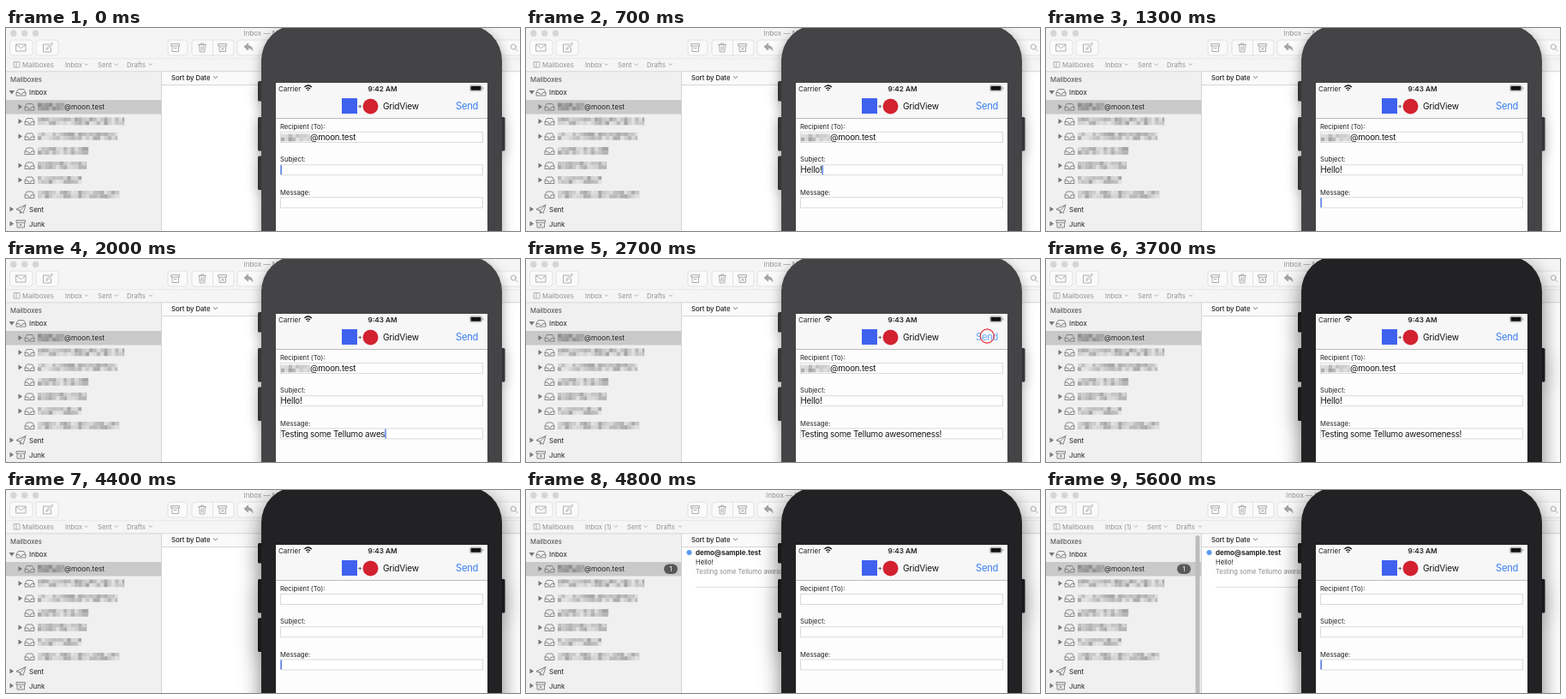
These frames come from a looping animation (600 px wide and 237 px high, 5700 ms). An HTML page:

```html
<!DOCTYPE html>
<html lang="en">
<head>
<meta charset="utf-8">
<title>Mail form</title>
<style>
  html, body { margin: 0; width: 100%; height: 100%; overflow: hidden; background: #fff; }
  svg { display: block; width: 600px; height: 237px; }
  text { font-family: Inter, "Liberation Sans", sans-serif; font-size: 8px; fill: #222; white-space: pre; }
  .small { font-size: 7.7px; }
  .dim { fill: #929292; }
  .input { font-size: 9.8px; letter-spacing: -.025em; fill: #161616; }
  .line { fill: none; stroke: #a6a6a6; stroke-width: .9; stroke-linejoin: round; stroke-linecap: round; }
  .tray { fill: none; stroke: #7c7c7c; stroke-width: .9; stroke-linejoin: round; }
  .button { fill: #fbfafb; stroke: #dcdcdc; stroke-width: .8; }
  #phone { filter: drop-shadow(0 4px 7px rgba(0, 0, 0, .36)); }
  #phone.active { filter: drop-shadow(0 8px 12px rgba(0, 0, 0, .52)); }
  .shell { fill: #444446; }
  .side { fill: #353537; }
  .active .shell { fill: #222224; }
  .active .side { fill: #19191b; }
</style>
</head>
<body>
<svg viewBox="0 0 600 237">
  <rect width="600" height="237" fill="#fff"/>
  <rect width="600" height="51" fill="#f6f5f6"/>
  <rect x="182" y="51" width="120" height="15.500" fill="#fafafa"/>
  <rect y="51" width="181" height="186" fill="#f1f0f1"/>
  <rect y="84" width="181" height="16.500" fill="#c9c9c9"/>
  <path d="M0 50.800H600M181.500 51V237M182 66.500H300" stroke="#d6d6d6" fill="none"/>
  <path d="M0 35.800H600" stroke="#e6e6e6" fill="none"/>
  <g fill="#d6d6d6">
    <circle cx="8.800" cy="6.300" r="3.700"/>
    <circle cx="21.700" cy="6.300" r="3.700"/>
    <circle cx="34.600" cy="6.300" r="3.700"/>
  </g>
  <text class="dim" id="title" y="9">Inbox — Messages</text>

  <g class="button">
    <rect x="4.500" y="14" width="26.500" height="18" rx="3"/>
    <rect x="35" y="14" width="26" height="18" rx="3"/>
    <rect x="189" y="14" width="22.500" height="18" rx="3"/>
    <rect x="217" y="14" width="49" height="18" rx="3"/>
    <path d="M241.500 14V32"/>
    <rect x="270" y="14" width="60" height="18" rx="3"/>
    <rect x="560" y="14" width="50" height="18" rx="3"/>
  </g>
  <g class="line">
    <path d="M12 19h11v8H12zM12 19.500l5.500 4.200L23 19.500"/>
    <path d="M50 19h-6.500v9h9v-5M47 25l1-2.500 5.500-5.500 1.300 1.300L49.200 24z"/>
    <path d="M193 18.500h9.500v2.500H193zM194 21v6.500h7.500V21M196.500 23.500h2.500"/>
    <path d="M224.500 19.500h9M227.500 19.500v-1.500h3v1.500M225.500 19.500l.7 8.500h5.600l.7-8.500M228 21.500v4.500M230 21.500v4.500"/>
    <path d="M248 18.500h9.500V21H248zM249 21v6.500h7.500V21M251 22.500l3.500 3.500M254.500 22.500L251 26"/>
    <path d="M282.500 18l-4.500 4 4.500 4v-2.500q4-.3 5.500 3-.3-6-5.500-6z" fill="#a6a6a6"/>
    <circle cx="592.300" cy="22" r="3"/><path d="M594.600 24.300l2.600 2.600"/>
    <path d="M9.500 39.500h6.500v6.500H9.500zM12 39.500v6.500" stroke-width=".8"/>
  </g>

  <text class="small dim" x="19" y="45.500">Mailboxes</text>
  <text class="small dim" x="69" y="45.500" id="inboxTab">Inbox</text>
  <g id="tabs">
    <path class="line" d="M92 41.700l1.800 1.800 1.800-1.800"/>
    <text class="small dim" x="107" y="45.500">Sent</text>
    <path class="line" d="M127 41.700l1.800 1.800 1.800-1.800"/>
    <text class="small dim" x="141" y="45.500">Drafts</text>
    <path class="line" d="M167 41.700l1.800 1.800 1.800-1.800"/>
  </g>
  <text class="small" x="193" y="60.600" font-weight="500">Sort by Date</text>
  <path class="line" d="M242.500 56.700l2 2 2-2" style="stroke:#555"/>

  <text class="small" x="5" y="62.700" style="fill:#444">Mailboxes</text>
  <g id="sidebar"></g>
  <rect id="scrollbar" x="174.500" y="53" width="5" height="190" rx="2.500" fill="#bcbcbc"/>

  <g id="badge">
    <rect x="161" y="86.500" width="16" height="11.500" rx="5.700" fill="#585858"/>
    <text x="169" y="95" text-anchor="middle" style="fill:#fff;font-size:7.500px">1</text>
  </g>

  <g id="mail">
    <circle cx="190.500" cy="73" r="3" fill="#5b9af0"/>
    <text x="198" y="76" font-weight="700">demo@sample.test</text>
    <text class="small" x="198" y="87">Hello!</text>
    <text x="198" y="98" style="fill:#8a8a8a;font-size:7.500px">Testing some Tellumo awesomeness!</text>
    <path d="M198 113.500H300" stroke="#ddd"/>
  </g>

  <g id="phone">
    <g class="side">
      <rect x="294" y="62" width="8" height="23.500" rx="1.500"/>
      <rect x="294" y="104" width="8" height="39.500" rx="1.500"/>
      <rect x="294" y="149.500" width="8" height="39.500" rx="1.500"/>
      <rect x="575" y="104" width="7.500" height="39.500" rx="1.500"/>
    </g>
    <rect class="shell" x="298" y="-4" width="281" height="300" rx="42"/>
  </g>

  <rect x="315" y="64" width="247" height="173" fill="#fdfdfe"/>
  <rect x="315" y="64" width="247" height="41.500" fill="#f7f7f8"/>
  <path d="M315 105.500H562" stroke="#bcbcbe"/>
  <text x="318" y="73.500" style="font-size:8px">Carrier</text>
  <g fill="none" stroke="#111" stroke-width="1.300">
    <path d="M348.500 69q4.200-3.900 8.400 0M350.300 71q2.400-2.200 4.800 0"/>
    <path d="M351.800 72.200h1.800l-.9 1z" fill="#111" stroke-width=".6"/>
  </g>
  <text id="clock" x="439.500" y="73.500" text-anchor="middle" font-weight="600" style="font-size:8.200px"></text>
  <rect x="541.500" y="66.800" width="14" height="7" rx="1.600" fill="none" stroke="#a5a5a7" stroke-width=".7"/>
  <rect x="542.500" y="67.800" width="12" height="5" rx=".8" fill="#111"/>
  <rect x="556.300" y="69" width="1" height="2.500" rx=".5" fill="#a5a5a7"/>

  <rect x="392" y="82" width="18" height="18" fill="#3f62ee"/>
  <text x="410.500" y="94">+</text>
  <circle cx="425.500" cy="91.500" r="9" fill="#d3222f"/>
  <text class="input" x="440" y="95" style="font-size:10.200px">GridView</text>
  <text class="input" id="send" x="525" y="95.200" style="font-size:11.200px">Send</text>

  <g id="form"></g>
  <g id="recipient">
    <g id="recipientName"></g>
    <text class="input" x="355" y="131">@moon.test</text>
  </g>
  <text class="input" id="subject" x="320.500" y="169.300"></text>
  <text class="input" id="message" x="320.500" y="207.600"></text>
  <rect id="caret" width="1.400" height="11" fill="#4a78e8"/>
  <circle id="ring" cx="538.300" cy="90" fill="none" stroke="#e2232f" stroke-width="1.100"/>
</svg>
<script>
const LOOP = 5700, STEP = 100;
const SUBJECT = 'Hello!', MESSAGE = 'Testing some Tellumo awesomeness!';
const CLOCK_TURN = 900, FOCUS_MESSAGE = 1200, PRESS = 2600, ACTIVATE = 2800;
const CLEAR = 3900, ARRIVE = 4500, SCROLLBAR = 5100;
const $ = id => document.getElementById(id);
const show = (id, on) => $(id).setAttribute('visibility', on ? 'visible' : 'hidden');
const shift = (id, dx) => $(id).setAttribute('transform', `translate(${dx})`);
const setText = (id, s) => { if ($(id).textContent !== s) $(id).textContent = s; };

let seed = 11;
const random = () => (seed = seed * 16807 % 2147483647) / 2147483647;

// Coarse grey blocks standing in for a hidden name
function mosaic(x, y, width, dark, light) {
  const cell = 4.3;
  let out = '';
  for (let row = 0; row < 2; row++) {
    for (let dx = 0; dx < width; dx += cell) {
      const g = Math.round(dark + (light - dark) * random());
      const w = Math.min(cell, width - dx) + .2;
      out += `<rect x="${x + dx}" y="${y - 4.5 + row * cell}" width="${w}" height="${cell + .2}" fill="rgb(${g},${g},${g})"/>`;
    }
  }
  return out;
}

const tray = (x, y) => `<path class="tray" d="M${x} ${y + .5}l2.300-4h6.400l2.300 4v3.500h-11zh3.300q.3 2 2.200 2t2.200-2h3.300"/>`;
const closed = (x, y) => `<path d="M${x} ${y - 3}l4.500 3-4.500 3z" fill="#757575"/>`;
const label = (y, s) => `<text x="27" y="${y + 3}">${s}</text>`;

function buildSidebar() {
  // [row centre, hidden width, expandable]
  const accounts = [[92, 31, 1], [109, 101, 1], [126.5, 93, 1], [143.5, 59, 0],
                    [160.5, 57, 1], [177.5, 51, 1], [194.5, 95, 0]];
  let out = '<path d="M3.500 73h6.500l-3.250 4.500z" fill="#757575"/>' + tray(12, 75) + label(75, 'Inbox');
  accounts.forEach(([y, w, open], i) => {
    out += (open ? closed(14.5, y) : '') + tray(22, y);
    out += i ? mosaic(37, y, w, 165, 226) : mosaic(37, y, w, 138, 194);
  });
  out += '<text x="68" y="95" style="font-size:8.300px">@moon.test</text>';
  out += closed(4.5, 211.5) + '<path class="tray" d="M12 211.500l11-5-3 10-3.500-3zl4.500 1.500 6.500-6.500M16.500 213v3.500l1.700-2"/>' + label(211.5, 'Sent');
  out += closed(4.5, 228.5) + '<path class="tray" d="M12 224.500h10.500v2.500H12zM13 227v6h8.500v-6M15.700 228.500l3 3M18.700 228.500l-3 3"/>' + label(228.5, 'Junk');
  $('sidebar').innerHTML = out;
}

function buildForm() {
  $('form').innerHTML = ['Recipient (To):', 'Subject:', 'Message:'].map((s, i) => {
    const y = 121.5 + i * 38.2;
    return `<text x="320" y="${y - 3.4}" style="font-size:7.700px">${s}</text>` +
      `<rect x="320.500" y="${y}" width="236" height="12" fill="#fff" stroke="#dadade"/>`;
  }).join('');
  $('recipientName').innerHTML = mosaic(321, 128, 34, 165, 225);
}

const typed = (s, t, start, pace) => s.slice(0, Math.max(0, Math.floor((t - start) / pace)));

function drawCaret(t) {
  const field = t < FOCUS_MESSAGE ? 'subject' : 'message';
  const phase = ((t - ACTIVATE) % 1200 + 1200) % 1200;
  const length = $(field).textContent ? $(field).getComputedTextLength() : 0;
  $('caret').setAttribute('x', 320.5 + length);
  $('caret').setAttribute('y', field === 'subject' ? 160.2 : 198.4);
  show('caret', t < 2200 || phase < 600);
}

function drawMail(t) {
  const arrived = t >= ARRIVE, scrollable = t >= SCROLLBAR;
  show('mail', arrived);
  show('badge', arrived);
  show('scrollbar', scrollable);
  shift('badge', scrollable ? -8 : 0);
  shift('tabs', arrived ? 11 : 0);
  setText('inboxTab', arrived ? 'Inbox (1)' : 'Inbox');
  $('title').setAttribute('x', arrived ? 280 : 277.5);
}

function render(t) {
  const cleared = t >= CLEAR;
  setText('clock', t < CLOCK_TURN ? '9:42 AM' : '9:43 AM');
  setText('subject', cleared ? '' : typed(SUBJECT, t, 100, 100));
  setText('message', cleared ? '' : typed(MESSAGE, t, 1300, 27));
  show('recipient', !cleared);
  drawCaret(t);
  drawMail(t);
  $('phone').setAttribute('class', t >= ACTIVATE ? 'active' : '');
  $('send').style.fill = t > PRESS && t < 3100 ? '#68a8f5' : '#397ff0';
  show('ring', t > PRESS && t <= ACTIVATE);
  $('ring').setAttribute('r', Math.max(0, (t - PRESS) * .081));
}

buildSidebar();
buildForm();
const start = performance.now();
function tick() {
  const t = (performance.now() - start) % LOOP;
  render(Math.floor(t / STEP) * STEP);
  requestAnimationFrame(tick);
}
tick();
</script>
</body>
</html>
```
